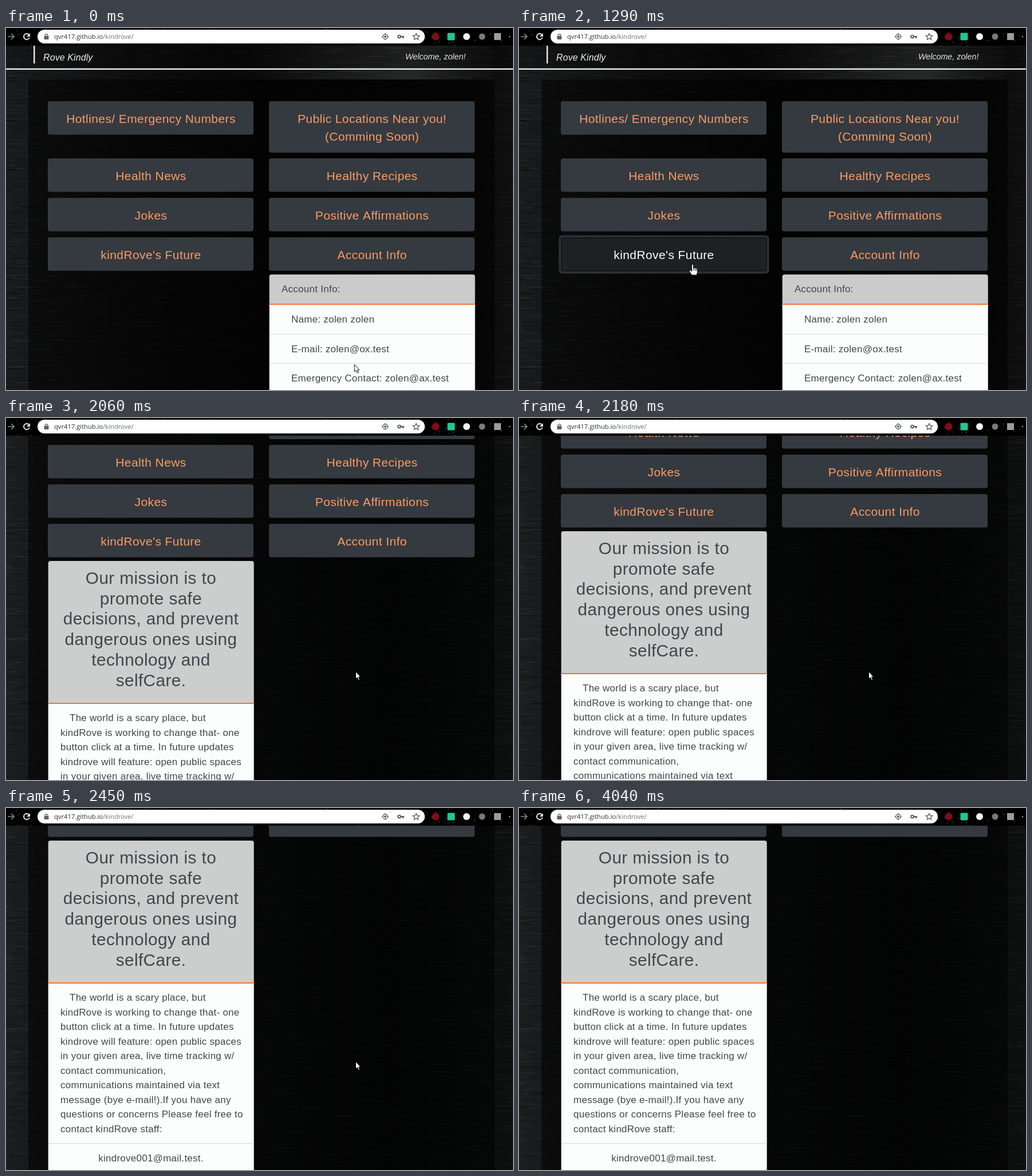
Animation of 885 by 633 pixels, one loop 7.72 s. Source, as an HTML page with a canvas:

```html
<!DOCTYPE html>
<html lang="en">
<head>
<meta charset="utf-8">
<title>Rove Kindly</title>
<style>
html, body { margin: 0; width: 100%; height: 100%; overflow: hidden; background: #000; }
canvas { display: block; }
</style>
</head>
<body>
<canvas id="stage" width="885" height="633"></canvas>
<script>
const W = 885, H = 633, BAR = 31, LOOP = 7720;
const SANS = '"Liberation Sans", Arial, sans-serif';
const ORANGE = '#fb9a62', SLATE = '#343a40', INK = '#42464a';
const stage = document.getElementById('stage').getContext('2d');
let g = stage;

// time, cursor x, cursor y, cursor shape, scroll offset
const POSES = [
  [0, 608, 588, 'arrow', 0],
  [150, 625, 609, 'arrow', 0],
  [270, 592, 598, 'arrow', 0],
  [390, 520, 570, 'arrow', 0],
  [510, 430, 532, 'arrow', 0],
  [630, 361, 506, 'arrow', 0],
  [780, 336, 481, 'arrow', 0],
  [900, 308, 445, 'arrow', 0],
  [1020, 295, 424, 'arrow', 0],
  [1170, 303, 413, 'hand', 0],
  [1290, 303, 413, 'hand', 0],
  [1410, 303, 413, 'beam', 181],
  [1550, 336, 434, 'beam', 181],
  [1670, 392, 470, 'beam', 181],
  [1790, 448, 504, 'arrow', 181],
  [1940, 560, 462, 'arrow', 181],
  [2060, 610, 443, 'arrow', 181],
  [2180, 610, 443, 'arrow', 233],
  [2300, 610, 443, 'arrow', 320],
  [2450, 610, 443, 'arrow', 374],
  [3410, 650, 470, 'arrow', 374],
  [3530, 722, 522, 'arrow', 374],
  [3650, 788, 578, 'arrow', 374],
  [3770, 839, 619, 'arrow', 374],
  [3920, 850, 627, 'arrow', 374],
  [4040, 0, 0, 'none', 374]
];
const HOVER_AT = 1170, FOCUS_AT = 1290, OPEN_AT = 1410;

const BUTTONS = [
  [73, 128, 'Hotlines/ Emergency Numbers'],
  [459, 128, 'Public Locations Near you!', '(Comming Soon)'],
  [73, 228, 'Health News'], [459, 228, 'Healthy Recipes'],
  [73, 297, 'Jokes'], [459, 297, 'Positive Affirmations'],
  [73, 366, "kindRove's Future"], [459, 366, 'Account Info']
];
const ACCOUNT = ['Name: zolen zolen', 'E-mail: zolen@ox.test', 'Emergency Contact: zolen@ax.test'];
const MISSION = ['Our mission is to', 'promote safe', 'decisions, and prevent',
  'dangerous ones using', 'technology and', 'selfCare.'];
const STORY = ['The world is a scary place, but', 'kindRove is working to change that- one',
  'button click at a time. In future updates', 'kindrove will feature: open public spaces',
  'in your given area, live time tracking w/', 'contact communication,',
  'communications maintained via text', 'message (bye e-mail!).If you have any',
  'questions or concerns Please feel free to', 'contact kindRove staff:'];

function random(seed) {
  return () => (seed = (seed * 16807) % 2147483647) / 2147483647;
}

function rect(x, y, w, h, color) {
  g.fillStyle = color;
  g.fillRect(x, y, w, h);
}

function round(x, y, w, h, r, color) {
  g.fillStyle = color;
  g.beginPath();
  g.roundRect(x, y, w, h, r);
  g.fill();
}

function disc(x, y, r, color) {
  g.fillStyle = color;
  g.beginPath();
  g.arc(x, y, r, 0, 7);
  g.fill();
}

function lines(color, width, ...paths) {
  g.strokeStyle = color;
  g.lineWidth = width;
  for (const p of paths) g.stroke(new Path2D(p));
}

function ring(x, y, r, color, width, from = 0, to = Math.PI * 2) {
  g.strokeStyle = color;
  g.lineWidth = width;
  g.beginPath();
  g.arc(x, y, r, from, to);
  g.stroke();
}

function text(s, x, y, size, color, { align = 'left', gap = 0, font = SANS, style = '' } = {}) {
  g.font = `${style} ${size}px ${font}`;
  g.letterSpacing = gap + 'px';
  g.textAlign = align;
  g.fillStyle = color;
  g.fillText(s, x, y);
}

function layer(paint) {
  const canvas = document.createElement('canvas');
  canvas.width = W;
  canvas.height = H;
  g = canvas.getContext('2d');
  paint();
  g = stage;
  return canvas;
}

// Brushed dark surface: a horizontal gradient under faint streaks.
function brushed(seed, stops, weight) {
  return layer(() => {
    const shade = g.createLinearGradient(0, 0, W, 0);
    stops.forEach(([at, color]) => shade.addColorStop(at, color));
    rect(0, 0, W, H, shade);
    const rnd = random(seed);
    for (let i = 0; i < 6500; i++) {
      const len = 6 + rnd() * 40, x = rnd() * (W + len) - len, y = Math.floor(rnd() * H);
      const a = rnd() * weight(x + len / 2, y);
      rect(x, y, len, 1, rnd() < 0.5 ? `rgba(170,175,180,${a * 0.1})` : `rgba(0,0,0,${a * 0.45})`);
    }
  });
}

const closedWall = brushed(77, [[0, '#1a1b1c'], [0.25, '#0d0d0e'], [0.5, '#060606'], [0.9, '#080808'], [1, '#101011']],
  (x, y) => 0.15 + Math.exp(-x / 200) + 0.5 * Math.exp((x - W) / 50) +
    1.4 * Math.exp(-(((x - 660) / 150) ** 2) - ((y - 50) / 45) ** 2));
const openWall = brushed(191, [[0, '#1d1e1f'], [0.12, '#121213'], [0.55, '#0b0c0c'], [0.75, '#060707'], [1, '#0e0f0f']],
  (x) => 0.4 + 0.6 * Math.exp(-x / 80) + 0.4 * Math.exp((x - W) / 60));

function paintToolbar() {
  rect(0, 0, W, BAR, '#000');
  const rnd = random(4021);
  for (let i = 0; i < 110; i++) {
    rect(Math.floor(rnd() * W), Math.floor(rnd() * BAR), 1, 1, `rgba(225,230,240,${0.2 + rnd() * 0.6})`);
  }
  round(55, 3, 676, 24, 12, '#fff');
  lines('#85888b', 1.7, 'M3 15H14M9 10L14 15L9 20');
  ring(36, 15, 5, '#eee', 1.8, 0.3, 5.5);
  g.fillStyle = '#eee';
  g.fill(new Path2D('M42 9V15H36Z'));

  round(66.5, 13.5, 8, 6.5, 1, '#5f6368');
  ring(70.5, 13, 2.4, '#5f6368', 1.3, Math.PI, 0);
  const font = '"Open Sans", sans-serif';
  const host = 'qvr417.github.io';
  text(host, 84, 19, 11.2, '#2b2e31', { font });
  text('/kindrove/', 84 + g.measureText(host).width, 19, 11.2, '#6c7074', { font });

  ring(662, 15, 4.2, '#55595d', 1.3);
  disc(662, 15, 2, '#55595d');
  lines('#55595d', 1.3, 'M662 9V11M662 19V21M656 15H658M666 15H668');
  ring(686.5, 15, 2.4, '#55595d', 1.9);
  lines('#55595d', 2.2, 'M689 15H695M693 15V18');
  lines('#55595d', 1.3, 'M716 9.5L717.7 13.2L721.7 13.6L718.7 16.3L719.6 20.2L716 18.1L712.4 20.2L713.3 16.3L710.3 13.6L714.3 13.2Z');

  disc(750, 15, 6.5, '#850b16');
  round(770.5, 8.5, 13, 13, 2, '#20c792');
  disc(804, 15, 6, '#f4f4f4');
  disc(831, 15, 5.5, '#77797b');
  rect(852, 9, 12, 12, '#9b9c9d');
  rect(878, 14, 2, 2, '#aaa');
}
const toolbar = layer(paintToolbar);

function button([x, y, ...labels], hovered, focused) {
  const h = 58.5 + 31.5 * (labels.length - 1);
  if (focused) round(x - 3.5, y - 3.5, 367, 67, 6, '#2d3136');
  if (hovered) {
    round(x, y, 360, h + 1, 4, '#111416');
    round(x + 1.5, y + 1.5, 357, h - 2, 3, '#1d2124');
  } else {
    round(x, y, 359, h, 4, SLATE);
  }
  labels.forEach((s, i) =>
    text(s, x + 180, y + 37.5 + i * 31.5, 21, hovered ? '#fff' : ORANGE, { align: 'center', gap: 0.4 }));
}

function card(x, headHeight, headColor) {
  round(x, 431, 359, headHeight + 4, [4, 4, 0, 0], headColor);
  rect(x, 431 + headHeight, 359, 600, '#fcfdfd');
  rect(x, 431 + headHeight, 359, 2, '#f0762c');
}

function accountCard() {
  card(459.7, 51, '#cbcbcb');
  text('Account Info:', 481, 462, 17, INK, { gap: 0.26 });
  ACCOUNT.forEach((s, i) => {
    if (i) rect(460, Math.round(483 + 51.7 * i), 359, 1, '#d9dbdc');
    text(s, 498, 515 + 51.7 * i, 17, INK, { gap: 0.26 });
  });
}

function missionCard() {
  card(73.7, 248, '#cccece');
  MISSION.forEach((s, i) => text(s, 253, 471 + 35.7 * i, 29.75, INK, { align: 'center', gap: 0.4 }));
  STORY.forEach((s, i) => text(s, i ? 95 : 111, 711 + 25.5 * i, 17, INK, { gap: 0.26 }));
  rect(74, 960, 359, 1.3, '#dcdedf');
  text('kindrove001@mail.test.', 253, 992, 17, INK, { align: 'center', gap: 0.26 });
}

const CURSORS = {
  arrow() {
    const p = new Path2D('M.5 .5V13.2L3.3 10.6L5.4 15.3L7.4 14.4L5.4 9.9H9Z');
    g.fillStyle = '#fff';
    g.fill(p);
    lines('#000', 0.9, p);
  },
  hand() {
    const p = new Path2D('M-1.5 1Q0 -1 1.5 1V7Q3 5.6 4.2 7.2Q5.6 6 6.6 7.8Q8.6 7.2 8.6 9.4V14L7 19H-1.5L-5.5 12.5Q-6 9.6 -3.4 10.8L-1.5 12.5Z');
    g.fillStyle = '#fff';
    g.fill(p);
    lines('#000', 0.9, p, 'M1.5 7V11M4.2 8V11.5M6.6 8.5V12');
  },
  beam() {
    lines('#33373a', 1, 'M-2.5 -6.5H-.5L.5 -5.5L1.5 -6.5H3.5M.5 -5.5V5.5M-2.5 6.5H-.5L.5 5.5L1.5 6.5H3.5');
  },
  none() {}
};

function draw(t) {
  const [, x, y, shape, scroll] = POSES.findLast(p => p[0] <= t);
  const open = t >= OPEN_AT;
  g.drawImage(open ? openWall : closedWall, 0, 0);

  g.save();
  g.translate(0, -scroll);
  if (!open) {
    const glow = g.createLinearGradient(390, 0, 850, 0);
    glow.addColorStop(0, 'rgba(110,112,114,0)');
    glow.addColorStop(0.7, 'rgba(110,112,114,.3)');
    glow.addColorStop(1, 'rgba(110,112,114,.03)');
    rect(390, 31, 460, 59, glow);
  }
  rect(0, 31, W, 40, 'rgba(0,0,0,.2)');
  rect(39, 90, 814, 1100, 'rgba(0,0,0,.52)');
  rect(48, 31, 2.5, 31, '#e8e8e8');
  rect(0, 70.5, W, 2.5, '#e4e6e6');
  text('Rove Kindly', 65, 57, 16, '#eee', { style: 'italic', gap: 0.1 });
  text('Welcome, zolen!', 697, 55, 14.3, '#e4e4e4', { style: 'italic' });
  BUTTONS.forEach((b, i) => {
    const active = i === 6 && !open;
    button(b, active && t >= HOVER_AT, active && t >= FOCUS_AT);
  });
  (open ? missionCard : accountCard)();
  g.restore();

  g.drawImage(toolbar, 0, 0, W, BAR, 0, 0, W, BAR);
  g.save();
  g.translate(x, y);
  CURSORS[shape]();
  g.restore();
}

const start = performance.now();
function tick() {
  draw((performance.now() - start) % LOOP);
  requestAnimationFrame(tick);
}
tick();
</script>
</body>
</html>
```
